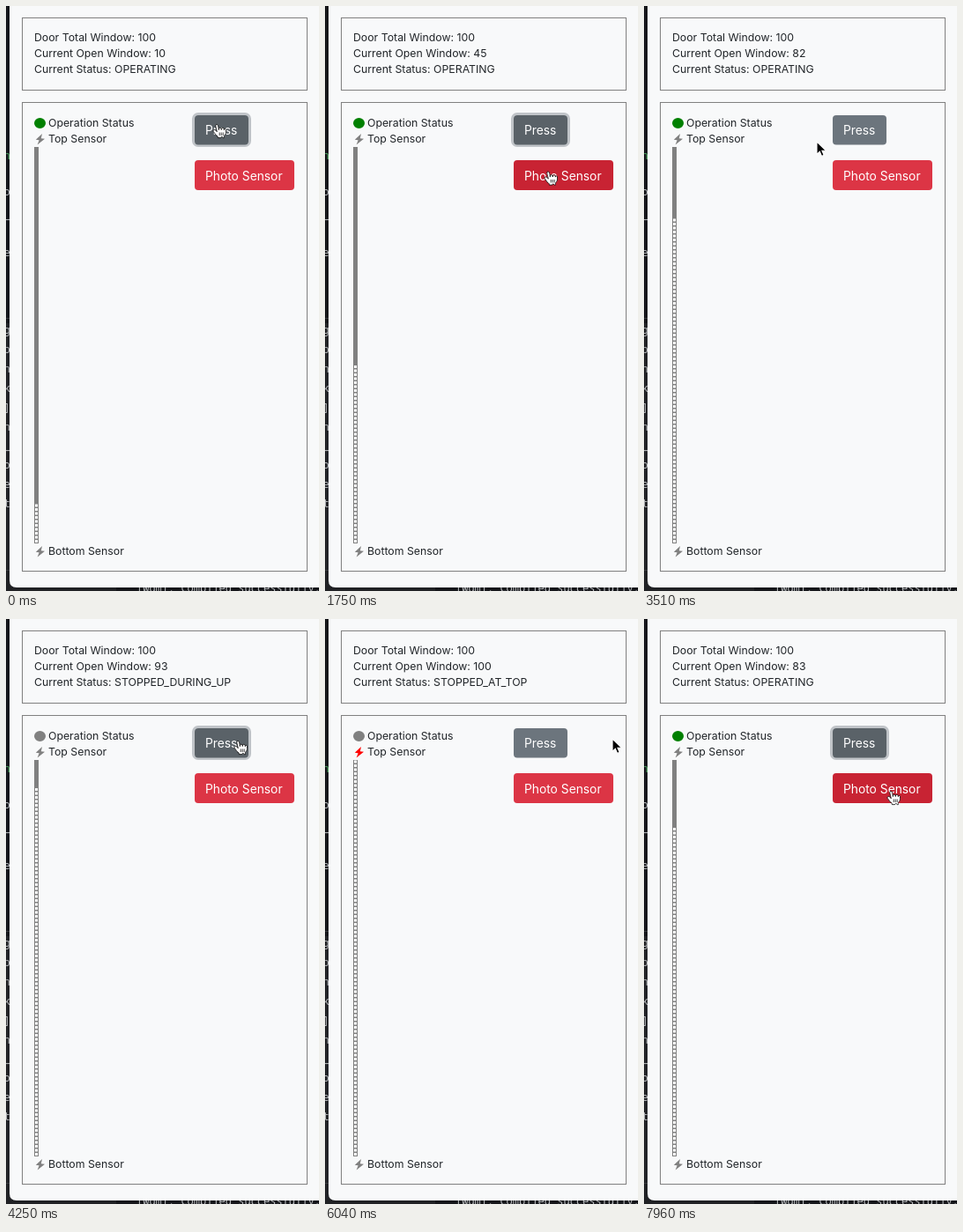
Recreate the animation shown at these times as an HTML page. Size 355x664 px, loop 8000 ms.

```html
<!DOCTYPE html>
<html lang="en">
<head>
<meta charset="utf-8">
<title>Door simulator</title>
<style>
  html, body { margin: 0; width: 100%; height: 100%; overflow: hidden; background: #1a1b1e; }
  svg { display: block; width: 355px; height: 664px; }
  text { font: 12.3px Inter, sans-serif; fill: #212529; white-space: pre; }
  .button text { font-size: 13.8px; fill: #fff; }
  .frame { fill: none; stroke: #808080; }
  .code text { font: 12px "Noto Sans Mono", monospace; fill: #b9bbbe; }
</style>
</head>
<body>
<svg viewBox="0 0 355 664">
  <defs>
    <path id="bolt" d="M8 0L.8 6.8 4.6 7.3 2.6 12.6 11 5.8 6.8 5.3z"/>
  </defs>
  <rect width="355" height="664" fill="#15161a"/>
  <path d="M0 360H10V640H0z" fill="#222326"/>
  <path d="M0 640.5H126M0 354.5H8" stroke="#38393c"/>
  <path d="M0 641H125V664H0z" fill="#202124"/>
  <g class="code" id="code"><text x="148" y="665">[wdm]: Compiled successfully.</text></g>
  <path d="M4 0H355V660H12Q4 660 4 652z" fill="#f8f9fa"/>
  <rect class="frame" x="18.5" y="13.5" width="323" height="82"/>
  <rect class="frame" x="18.5" y="109.5" width="323" height="532"/>

  <text x="32" y="40">Door Total Window: 100</text>
  <text x="32" y="58" id="openText"></text>
  <text x="32" y="76" id="statusText"></text>

  <ellipse id="lamp" cx="38.5" cy="133" rx="6.5" ry="6"/>
  <text x="48" y="137">Operation Status</text>
  <use id="topBolt" href="#bolt" x="33" y="145"/>
  <text x="48" y="155">Top Sensor</text>
  <use href="#bolt" x="33" y="613" fill="#808080"/>
  <text x="48" y="623">Bottom Sensor</text>

  <rect x="32" y="160" width="5" height="450" fill="#808080"/>
  <path id="opening" stroke="#fff" stroke-width="3" stroke-dasharray="3 1.5"/>

  <g class="button" id="press">
    <rect x="212.5" y="122.5" width="64" height="36" rx="5.5" fill="none" stroke-width="3"/>
    <rect x="214" y="124" width="61" height="33.5" rx="4"/>
    <text x="226" y="146">Press</text>
  </g>
  <g class="button" id="photo">
    <rect x="212.5" y="173.5" width="116" height="37" rx="5.5" fill="none" stroke-width="3"/>
    <rect x="214" y="175" width="113" height="34" rx="4"/>
    <text x="226" y="198">Photo Sensor</text>
  </g>

  <g id="cursor">
    <path id="arrow" d="M0 0V14.3L3.3 11.2 5.5 16.4 8.1 15.3 5.9 10.2H10.4z" stroke="#fff" stroke-width="1.1"/>
    <path id="hand" transform="translate(-13 -8)" fill="#fff" stroke="#000" stroke-width=".8" stroke-linejoin="round"
      d="M11.3 20.4c-.3-.4-.6-1.1-1.2-2-.3-.5-1.2-1.5-1.5-1.9-.2-.4-.2-.6-.1-1 .1-.6.7-1.1 1.4-1.1.5 0 1 .4 1.4.7.2.2.5.6.7.8.2.2.2.3.4.5.2.3.3.5.2.1-.1-.5-.2-1.3-.4-2.1-.1-.6-.2-.7-.3-1.1-.1-.5-.2-.8-.3-1.3-.1-.3-.2-1.1-.3-1.5-.1-.5-.1-1.4.3-1.8.3-.3.9-.4 1.3-.2.5.3.8 1 .9 1.3.2.5.4 1.2.5 2 .2 1 .5 2.5.5 2.8 0-.4-.1-1.1 0-1.5.1-.3.3-.7.7-.8.3-.1.6-.1.9-.1.3.1.6.3.8.5.4.6.4 1.9.4 1.8.1-.4.1-1.2.3-1.6.1-.2.5-.4.7-.5.3-.1.7-.1 1 0 .2 0 .6.3.7.5.2.3.3 1.3.4 1.7 0 .1.1-.4.3-.7.4-.6 1.8-.8 1.9.6v1.9c0 .5-.1 1.6-.2 2.1-.1.3-.4 1-.7 1.4 0 0-1.1 1.2-1.2 1.8-.1.6-.1.6-.1 1 0 .4.1.9.1.9s-.8.1-1.2 0c-.4-.1-.9-.8-1-1.1-.2-.3-.5-.3-.7 0-.2.4-.7 1.1-1.1 1.1-.7.1-2.1 0-3.1 0 0 0 .2-1-.2-1.4-.3-.3-.8-.8-1.1-1.1z"/>
    <path id="creases" transform="translate(-13 -8)" d="M19.6 17.5v3.5M17.6 17.5v3.5M15.6 17.5v3.5" stroke="#000" stroke-width=".75"/>
  </g>
</svg>
<script>
const LOOP = 8000;
const $ = id => document.getElementById(id);

// Keys: [time, value...], linear in between
const OPEN = [[0, 10], [880, 27], [2340, 57], [3510, 82], [4100, 93], [5303, 93],
  [5450, 95], [5600, 98], [5745, 100], [7110, 100], [7960, 83]];
const POINTER = [[0, 239.6, 134], [1200, 239.6, 134], [1750, 253.6, 187.5], [2380, 253.6, 187.5],
  [3070, 196, 154], [3520, 196, 154], [4090, 263.6, 138], [5460, 263.6, 138], [5740, 326, 136],
  [6350, 326, 136], [6620, 247, 138], [7370, 247, 138], [7800, 280.6, 195]];

const BUTTONS = [
  { id: "press", top: 124, bottom: 157.5, right: 275, fill: "#6c757d", dark: "#5a6268", ring: "#c0c4c8",
    focus: [[0, 1900], [4230, 6030], [7210, LOOP]] },
  { id: "photo", top: 175, bottom: 209, right: 327, fill: "#dc3545", dark: "#c82333", ring: "#eda6af",
    focus: [[1900, 3070]] },
];

const within = (t, spans) => spans.some(([from, to]) => t >= from && t < to);

function sample(keys, t) {
  const next = keys.findIndex(key => key[0] > t);
  if (next < 0) return keys.at(-1).slice(1);
  const a = keys[next - 1], b = keys[next];
  const p = (t - a[0]) / (b[0] - a[0]);
  return a.slice(1).map((v, i) => v + (b[i + 1] - v) * p);
}

// The screen refreshes in coarse steps
function snap(t) {
  const [start, step, lead] = t < 5448 ? [0, 146.3, 8] : [5450, 147.6, 2];
  return start + Math.floor((t - start + lead) / step) * step;
}

function draw(t) {
  const open = Math.round(sample(OPEN, t)[0]);
  const [x, y] = sample(POINTER, t);
  const stopped = within(t, [[4230, 5440]]);
  const atTop = open === 100;
  const status = stopped ? "STOPPED_DURING_UP" : atTop ? "STOPPED_AT_TOP" : "OPERATING";

  $("openText").textContent = `Current Open Window: ${open}`;
  $("statusText").textContent = `Current Status: ${status}`;
  $("lamp").setAttribute("fill", stopped || atTop ? "#808080" : "#008000");
  $("topBolt").setAttribute("fill", atTop ? "#f00" : "#808080");
  $("opening").setAttribute("d", `M34.5 609V${610 - 4.5 * open}`);

  let pointing = false;
  for (const b of BUTTONS) {
    const hover = x >= 214 && x <= b.right && y >= b.top && y <= b.bottom;
    const focused = within(t, b.focus);
    const [ring, face] = $(b.id).children;
    ring.setAttribute("stroke", focused ? b.ring : "none");
    face.setAttribute("fill", hover || focused ? b.dark : b.fill);
    pointing ||= hover;
  }
  $("cursor").setAttribute("transform", `translate(${x} ${y})`);
  $("arrow").style.display = pointing ? "none" : "";
  $("hand").style.display = $("creases").style.display = pointing ? "" : "none";
}

// Slivers of editor text beside the panel
[..."no_e"].forEach((c, i) => addSliver(c, [174, 215, 241, 284][i], i ? "" : "#4fae62"));
[..."gpnk]n_oet"].forEach((c, i) => addSliver(c, 372 + i * 21.9));
function addSliver(char, y, color = "") {
  const text = document.createElementNS("http://www.w3.org/2000/svg", "text");
  text.textContent = char;
  text.setAttribute("x", -2.5);
  text.setAttribute("y", y);
  text.style.fill = color;
  $("code").append(text);
}

const begin = performance.now();
function tick() {
  draw(snap((performance.now() - begin) % LOOP));
  requestAnimationFrame(tick);
}
tick();
</script>
</body>
</html>
```
